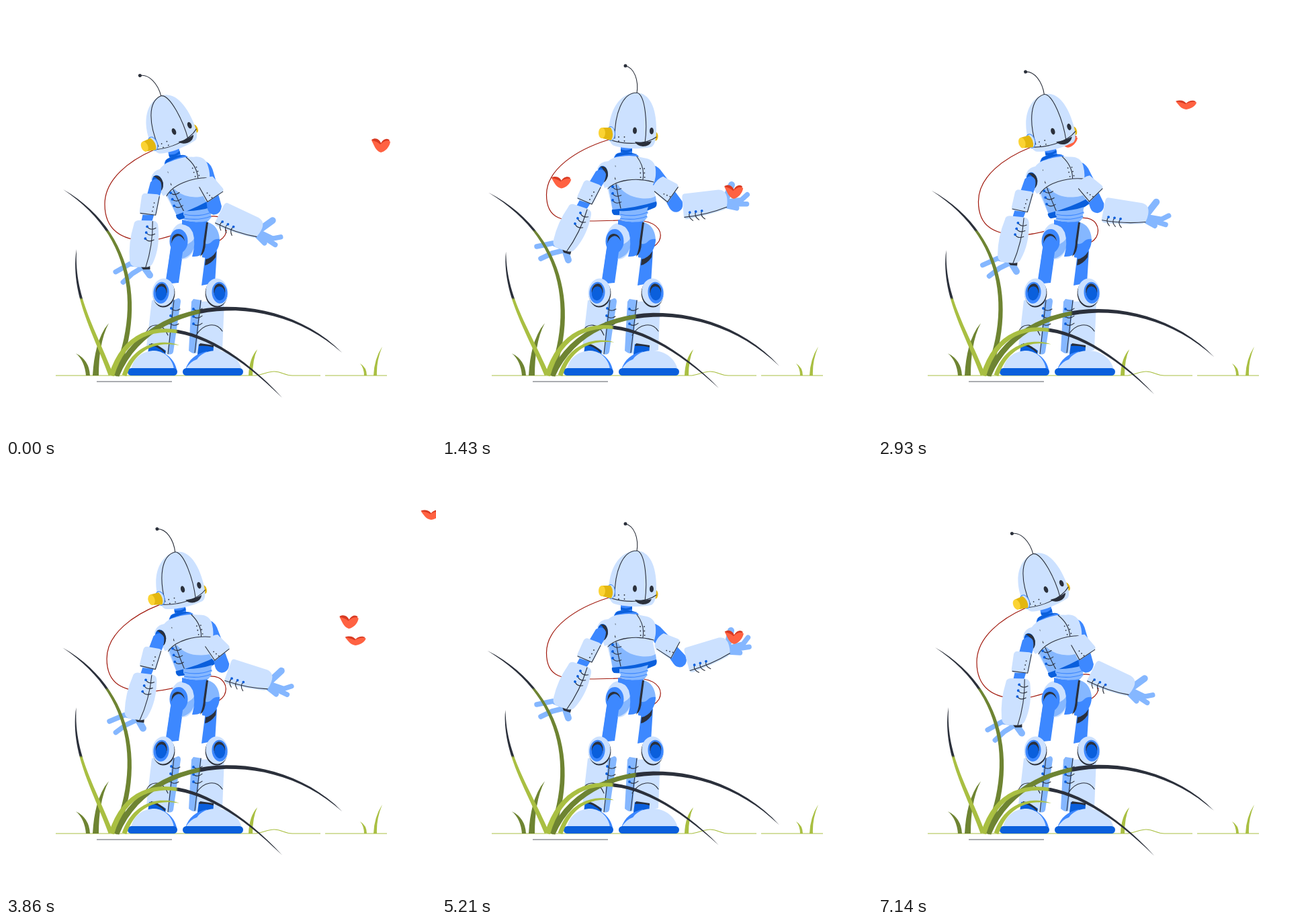
Write an HTML page that moves like this. It is 640 px wide and 640 px high and loops after 7.21 s.

```html
<!DOCTYPE html>
<html lang="en">
<head>
<meta charset="utf-8">
<title>Robot and butterflies</title>
<style>
html, body { margin: 0; width: 100%; height: 100%; overflow: hidden; background: #fff; }
svg { display: block; width: 100%; height: 100%; }
.light { fill: #cce1ff; } .mid { fill: #85b7ff; } .blue { fill: #3d88ff; } .deep { fill: #0a5fdc; }
.ink { fill: #2b303b; } .olive { fill: #6e8432; } .lime { fill: #a9bf42; }
.line { fill: none; stroke: #2b303b; stroke-width: 1.1; stroke-linecap: round; }
.finger { fill: none; stroke: #85b7ff; stroke-width: 7.5; stroke-linecap: round; stroke-linejoin: round; }
.thumb { stroke-width: 10; }
.ground { fill: none; stroke: #a9bf42; stroke-width: 1.2; }
</style>
</head>
<body>
<svg viewBox="0 0 640 640">
  <defs id="defs">
    <g id="butterfly">
      <path fill="#d93a22" d="M-14-8C-7-12-2-8 0-3C4-10 10-11 13-7L4 2-8 1Z"/>
      <path fill="#ff6242" d="M-14-7C-8-6-4-4-1-1C4-6 10-8 14-5C13 3 6 10 0 11C-8 9-10 0-14-7Z"/>
    </g>
  </defs>

  <path class="ground" d="M74 550H372C384 548 390 544 399 544C411 544 414 550 426 550H468M475 550H567"/>
  <path d="M135 559H247" stroke="#2b303b" stroke-width=".8"/>

  <g id="behind"></g>
  <path id="cord" fill="none" stroke="#a0180c" stroke-width="1.2"/>

  <g id="legs">
    <path class="blue" d="M247 347H266L257 412L237 414ZM297 368L314 364L311 412L291 416Z"/>
    <path class="ink" d="M297 377Q307 375 313 365L312 374Q305 384 296 386Z"/>
    <path class="light" d="M217 438L250 440L242 518Q222 516 209 507ZM290 440L325 438L322 512Q302 518 280 517Z"/>
    <path class="mid" d="M247 439L256 435Q260 435 260 440L249 515Q247 520 241 518ZM279 436L291 438L283 515Q280 520 272 513L276 440Z"/>
    <path class="line" d="M250 438L241 518M290 438L281 516M209 485C216 470 234 472 241 490M283 490C294 472 313 470 322 484"/>
    <path class="deep" d="M213 503Q228 505 238 513L236 525L211 518ZM287 503L309 507L308 520L284 526Z"/>
    <path class="ink" d="M216 502Q228 504 237 514V517Q226 506 214 505ZM289 502L309 505V508Q298 505 287 506Z"/>
    <path class="blue" d="M234 516Q250 524 254 541H236ZM267 541Q274 519 299 514L306 541Z"/>
    <path class="light" d="M186 541C190 522 205 513 221 513C238 514 249 528 250 541ZM279 541C281 524 292 513 313 513C334 513 347 526 351 541Z"/>
    <path class="light" d="M267 541Q274 529 284 526L290 541Z"/>
    <rect class="deep" x="181" y="539" width="74" height="11" rx="5.5"/>
    <rect class="deep" x="263" y="539" width="90" height="11" rx="5.5"/>
    <path class="mid" d="M296 321C312 323 318 336 318 350Q306 360 292 359Z"/>
    <path class="blue" d="M291 350Q300 358 306 351Q311 346 318 347C318 364 306 378 292 374Z"/>
    <ellipse class="light" cx="263" cy="350" rx="19" ry="27"/>
    <path class="mid" d="M266 356Q278 352 281 344C284 363 272 377 257 376Z"/>
    <path class="blue" d="M262 318Q281 324 300 319L298 345L294 365Q291 374 277 373Q283 353 278 337Q273 326 262 325Z"/>
    <path class="ink" d="M298 322H301L297 352Q297 367 289 373Q294 360 294 350Z"/>
    <ellipse class="blue" cx="257" cy="350" rx="13.5" ry="18"/>
    <path class="ink" d="M247 346C250 336 264 336 266 350Q261 340 254 343Q248 346 246 354Z"/>
    <path class="blue" d="M246 355Q249 344 257 346Q264 348 264 360L257 405H239Z"/>
  </g>

  <g id="armBack"><path class="blue" d="M307 238Q316 234 325 244L343 268L321 281L307 252Z"/></g>

  <g id="chest">
    <path class="blue" d="M266 207H283V221Q292 219 294 227L255 229Q257 218 266 218Z"/>
    <path class="deep" d="M266 213Q275 217 283 212V216Q273 220 266 217ZM260 220Q275 215 291 221Q275 220 257 225Z"/>
    <path class="light" d="M246 232Q255 224 266 224Q283 221 300 226Q317 228 318 243Q319 258 314 266L320 294Q290 310 254 305L246 270Q243 248 246 232Z"/>
    <path class="mid" d="M248 269L261 265Q272 283 295 286Q310 288 318 283L319 293Q290 303 254 304Z"/>
    <path class="deep" d="M253 303Q287 301 319 291Q321 297 317 300Q290 313 256 311Q252 308 253 303Z"/>
    <path class="line" d="M247 272C260 258 290 255 315 262M290 224C299 236 301 247 299 258M259 265Q262 284 266 301M258 238Q255 248 258 258"/>
  </g>
  <path class="mid" d="M264 305Q286 306 307 299Q304 305 307 308Q303 311 306 314L301 320Q281 324 264 318Q268 314 264 311Z"/>
  <path d="M265 310Q286 315 306 307M265 316Q286 320 305 313" fill="none" stroke="#3d88ff" stroke-width="1.2"/>

  <g id="head">
    <path class="line" d="M290 130C293 110 286 92 273 89"/><circle class="ink" cx="273" cy="89" r="2.5"/>
    <ellipse cx="318" cy="194" rx="3.5" ry="6.5" fill="#e3b70f"/>
    <path class="light" d="M248 188C249 150 268 129 290 129C309 130 319 151 319 184Q319 207 311 210C290 214 266 212 254 207Q248 202 248 188Z"/>
    <path class="line" d="M290 129C268 129 257 161 257 197M290 129C303 132 306 176 302 204M253 200C272 206 303 207 319 195"/>
    <path class="ink" d="M287 202Q300 204 312 201Q309 209 299 209Q290 208 287 202Z"/>
    <ellipse class="ink" cx="287" cy="185.5" rx="3" ry="5"/><ellipse class="ink" cx="312" cy="186" rx="3" ry="5"/>
    <ellipse class="light" cx="251" cy="190" rx="6.5" ry="10.5" stroke="#3d88ff"/>
    <path fill="#e3b70f" d="M238 181H251Q257 190 252 200L239 197Z"/>
    <ellipse cx="238" cy="189" rx="5" ry="8" fill="#fbd333"/>
  </g>

  <g id="armUpper">
    <path class="blue" d="M328 282L344 273L357 291Q360 303 350 307Q342 308 338 301Z"/>
    <path class="light" d="M314 268Q320 257 329 254L349 265Q353 268 350 272L337 291Q334 294 331 291L316 277Q312 273 314 268Z"/>
    <path class="line" d="M351 270L335 292L316 276"/>
  </g>
  <g id="armFore">
    <path class="finger" d="M422 293L445 291L454 283M426 296L453 297M422 299L438 303"/>
    <path class="finger thumb" d="M422 289L431 268"/>
    <path class="light" d="M357 285Q357 280 362 280L411 275Q423 275 424 289Q425 303 419 305Q390 314 364 318Q360 318 359 314Z"/>
    <path class="line" d="M360 315Q394 312 423 301"/>
  </g>

  <g id="leftUpper">
    <path class="light" d="M231 242Q236 230 249 231Q261 235 259 251Q254 268 242 271Z"/>
    <ellipse class="deep" cx="239" cy="250" rx="8" ry="12"/>
    <path class="ink" d="M235 239Q247 237 247 252Q245 261 240 263Q245 243 235 239Z"/>
    <path class="blue" d="M229 246Q240 239 244 250Q244 261 234 273L215 303Q205 308 200 298L217 266Z"/>
    <path class="light" d="M211 262Q214 258 218 260L234 266Q238 268 236 272L226 292Q224 296 220 294L204 289Q200 286 202 282Z"/>
    <path class="line" d="M202 286L223 295L236 270"/>
  </g>
  <g id="leftFore">
    <path class="finger" d="M181 360L165 353L141 358M180 364L164 368L147 376"/>
    <path class="finger thumb" d="M184 366L188 378"/>
    <path class="ink" d="M179 362L193 363L191 370L181 367Z"/>
    <path class="light" d="M188 299Q190 294 196 295L217 302Q223 305 222 311Q216 342 198 362Q194 367 186 365L171 360Q164 356 166 348Q172 322 188 299Z"/>
    <path class="line" d="M216 303Q206 337 185 366"/>
  </g>

  <g id="knees"></g>
  <g id="front"></g>

  <path class="olive" d="M104 517Q124 527 125 550H119Q117 528 104 517ZM153 472Q138 500 138 550H129Q132 496 153 472Z"/>
  <path class="lime" d="M374 511Q367 526 367 550H361Q362 524 374 511ZM527 532Q537 538 537 550H533Q533 539 527 532ZM560 507Q551 528 552 550H547Q548 525 560 507Z"/>
  <g id="grass"></g>
</svg>
<script>
const LOOP = 7210, HALF = LOOP / 2, STEP = LOOP / 101, TAU = 2 * Math.PI;
const INK = '#2b303b', OLIVE = '#6e8432', LIME = '#a9bf42';
const $ = id => document.getElementById(id);
const lerp = (a, b, k) => a + (b - a) * k;
const mix = (p, q, k) => p.map((v, i) => lerp(v, q[i], k));

function add(parent, name, attrs) {
  const node = document.createElementNS('http://www.w3.org/2000/svg', name);
  for (const key in attrs) node.setAttribute(key, attrs[key]);
  return $(parent).appendChild(node);
}

// Three laces in a row
function laces(id, x, y, dx, dy, turn) {
  for (let i = 0; i < 3; i++) $(id).innerHTML += `
    <g transform="translate(${x + i * dx} ${y + i * dy}) rotate(${turn})">
    <path class="line" d="M0 0q5 6 13 1"/><circle class="deep" r="1.9"/></g>`;
}
laces('chest', 254, 269, 0, 10, 8);
laces('armFore', 368, 308, 9, -1, 65);
laces('leftFore', 206, 308, -4, 8, 22);
laces('legs', 246, 450, -1, 11, 0);
laces('legs', 279, 451, 0, 11, -8);

function rivets(id, x, y, dx, dy, rows, gap) {
  for (let i = 0; i < rows; i++)
    for (const cx of gap ? [0, gap] : [0])
      add(id, 'circle', { class: 'ink', cx: x + i * dx + cx, cy: y + i * dy, r: .9 });
}
rivets('chest', 295, 242, .3, 6.5, 3, 6);
rivets('head', 263, 195, 0, 6, 2, 8.5);
rivets('armUpper', 330, 280, 4.5, 2, 3);
rivets('leftUpper', 226, 277, -3, 5.5, 3);

for (const [x, iris, side] of [[234, 231, 1], [314, 318, -1]]) {
  const ring = (color, cx, cy, rx, ry) =>
    add('knees', 'ellipse', { class: color, cx, cy, rx, ry, transform: `rotate(${5 * side} ${x} 427)` });
  ring('ink', x + side, 428, 16.5, 20.5);
  ring('light', x, 426, 16.5, 20.5);
  ring('blue', iris, 427, 11.5, 16);
  ring('ink', iris, 425, 8.5, 11.5);
  ring('deep', iris, 428, 8, 10.5);
}

// A tapered blade along a cubic spine; the sway moves the tip most
function blade({ spine, width, sway, colors, cut, axis }) {
  const id = 'tone' + $('grass').childElementCount;
  const tone = add('defs', 'linearGradient', {
    id, gradientUnits: 'userSpaceOnUse', x1: 0, y1: 0, x2: 0, y2: 0, [axis + 1]: cut, [axis + 2]: cut + 3
  });
  tone.innerHTML = `<stop stop-color="${colors[0]}"/><stop offset="1" stop-color="${colors[1]}"/>`;
  const node = add('grass', 'path', { fill: `url(#${id})` });
  return k => {
    const [a, b, c, d] = spine.map((p, i) => p.map((v, j) => v + sway[j] * k * [1, .55, .27, 0][i]));
    const left = [], right = [];
    for (let i = 0; i <= 28; i++) {
      const u = i / 28, w = 1 - u, half = width / 2 * u ** .6;
      const at = j => a[j] * w ** 3 + 3 * b[j] * w * w * u + 3 * c[j] * w * u * u + d[j] * u ** 3;
      const slope = j => (b[j] - a[j]) * w * w + 2 * (c[j] - b[j]) * w * u + (d[j] - c[j]) * u * u;
      const angle = Math.atan2(slope(1), slope(0));
      const nx = -Math.sin(angle) * half, ny = Math.cos(angle) * half;
      left.push([at(0) + nx, at(1) + ny]);
      right.unshift([at(0) - nx, at(1) - ny]);
    }
    node.setAttribute('d', 'M' + left.concat(right).join('L') + 'Z');
  };
}
const blades = [
  { spine: [[85, 273], [190, 338], [204, 450], [162, 550]], width: 8, sway: [-18, 5], colors: [INK, OLIVE], axis: 'y', cut: 333 },
  { spine: [[105, 362], [98, 430], [130, 480], [156, 549]], width: 7, sway: [-11, 4], colors: [INK, LIME], axis: 'y', cut: 434 },
  { spine: [[500, 516], [400, 420], [215, 428], [164, 550]], width: 9, sway: [2, 22], colors: [OLIVE, INK], axis: 'x', cut: 287 },
  { spine: [[411, 583], [305, 473], [190, 442], [157, 550]], width: 8, sway: [1, -16], colors: [LIME, INK], axis: 'x', cut: 253 },
  { spine: [[258, 505], [225, 496], [190, 508], [176, 550]], width: 7, sway: [-2, -5], colors: [LIME, LIME], axis: 'x', cut: 0 }
].map(blade);

// Smooth step from 0 at a to 1 at b
function ramp(t, a, b) {
  const u = Math.min(1, Math.max(0, (t - a) / (b - a)));
  return u * u * (3 - 2 * u);
}
const lean = t => ramp(t, 0, 800) - ramp(t, 2150, 3350) + ramp(t, 3450, 4450) - ramp(t, 5500, 7140);
const reach = t => ramp(t, 0, 2400) - ramp(t, 2150, 3400) + ramp(t, 3200, 5900) - ramp(t, 5900, 7140);

// Turns parts about their rest pivot, moves the pivot, and maps points the same way
function place(ids, [px, py], [x, y], deg) {
  for (const id of ids) $(id).setAttribute('transform', `translate(${x} ${y}) rotate(${deg}) translate(${-px} ${-py})`);
  const c = Math.cos(deg * TAU / 360), s = Math.sin(deg * TAU / 360);
  return ([u, v]) => [x + (u - px) * c - (v - py) * s, y + (u - px) * s + (v - py) * c];
}

function drawCord(start, p) {
  const x = lerp(147, 155.5, p), y = lerp(295, 281, p), low = lerp(349, 320, p), end = lerp(326, 323, p);
  $('cord').setAttribute('d', `M${start}C${lerp(185, 200, p)} ${start[1] + 15} ${x} ${y - 38} ${x} ${y}
    S${x + 25} ${low} ${x + 62} ${low}Q${x + 90} ${low} 285 ${lerp(325, 318, p)}
    M300 ${lerp(314, 320, p)}C${end} ${lerp(308, 324, p)} ${end + 6} ${lerp(328, 338, p)} ${end} ${lerp(341, 350, p)}q-3 5-8 8`);
}

const [visitor, riser, crosser] = [0, 1, 2].map(() => add('behind', 'use', { href: '#butterfly' }));
function fly(node, t, [x, y], offset) {
  const flap = .78 + .22 * Math.cos(TAU * (t / STEP * .15 + offset));
  node.setAttribute('transform', `translate(${x} ${y}) scale(${1.3 - .3 * flap} ${flap})`);
}

function draw(t) {
  const p = lean(t), a = reach(t), back = 1 - p;
  const chest = place(['chest'], [285, 300], [285 - 2 * back, 300], -15 * back);
  const head = place(['head'], [299.5, 185.5], [299.5 - 38 * back, 185.5 - 3.5 * back], -23 * back);
  const upper = place(['armBack', 'armUpper'], [313, 245], chest([313, 245]), 20.5 - 33 * a);
  const hand = place(['armFore'], [345, 300], upper([345, 300]), 31 - 50 * a);
  const left = place(['leftUpper'], [238, 249], chest([238, 249]), -16 * back);
  place(['leftFore'], [208, 299], left([208, 299]), -17.5 * back);

  drawCord(head([248, 199]), p);
  const sway = (1 - Math.cos(TAU * t / HALF)) / 2;
  blades.forEach(bend => bend(sway));

  // The visitor glides in, rests on the hand, then slips behind the head
  const phase = t < 3100 ? t : t - HALF;
  const landing = mix([558 - .19 * phase, 207 + .11 * phase], hand([434, 278]), ramp(phase, 400, 1000));
  const layer = $(phase > 600 && phase < 2500 ? 'front' : 'behind');
  if (visitor.parentNode !== layer) layer.append(visitor);
  fly(visitor, t, mix(landing, [262, 185], ramp(phase, 2250, 3130)), 0);
  fly(riser, t, [178 + .1875 * (t - 1430), 262 - .077 * (t - 1430)], .2);
  fly(crosser, t, [519 - .233 * (t - 3860), 263 + .041 * (t - 3860)], .55);
}

const start = performance.now();
function tick() {
  const t = (performance.now() - start) % LOOP;
  draw(Math.floor(t / STEP + .1) * STEP);
  requestAnimationFrame(tick);
}
tick();
</script>
</body>
</html>
```
